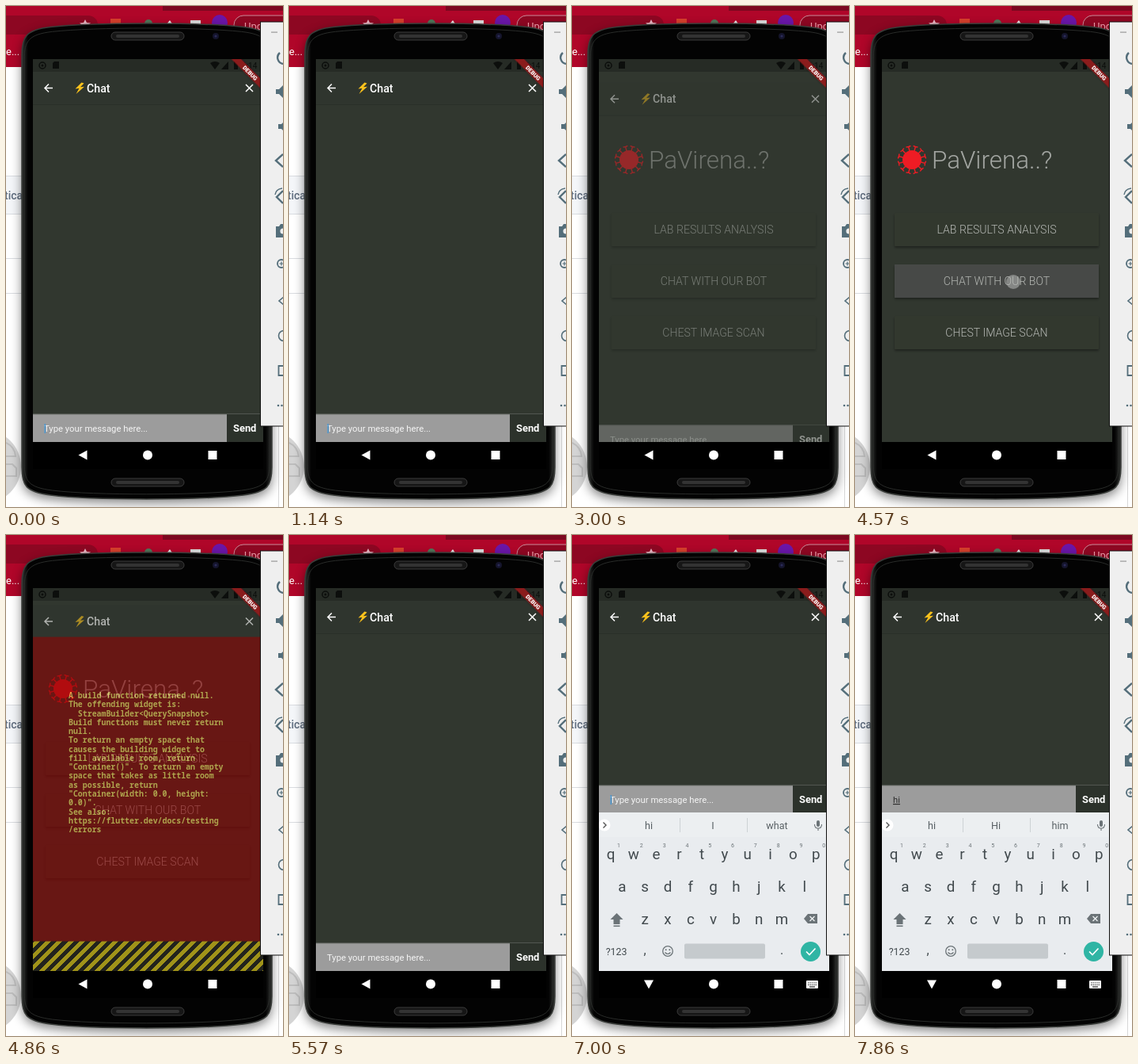
These frames come from a looping animation (350x632 px, 8 s). An HTML page:

```html
<!DOCTYPE html>
<html lang="en">
<head>
<meta charset="utf-8">
<title>Chat demo</title>
<style>
  html, body { margin: 0; width: 100%; height: 100%; overflow: hidden; background: #fff; }
  svg { display: block; width: 100%; height: 100%; font-family: Roboto, sans-serif; }
  text { white-space: pre; }
  .mono { font: 700 9.9px "Noto Sans Mono", "DejaVu Sans Mono", monospace; fill: #ffea62; }
</style>
</head>
<body>
<svg id="stage" viewBox="0 0 350 632"></svg>
<script>
const LOOP = 8000;
const DARK = '#31372f', BAR = '#2f352e';

// Markup helpers
const rect = (x, y, w, h, fill, extra = '') =>
  `<rect x="${x}" y="${y}" width="${w}" height="${h}" fill="${fill}" ${extra}/>`;
const circle = (x, y, r, fill, extra = '') =>
  `<circle cx="${x}" cy="${y}" r="${r}" fill="${fill}" ${extra}/>`;
const text = (x, y, s, size, fill, extra = '') =>
  `<text x="${x}" y="${y}" font-size="${size}" fill="${fill}" ${extra}>${s}</text>`;
const path = (d, fill, extra = '') => `<path d="${d}" fill="${fill}" ${extra}/>`;
const line = (d, color, width = 1.5, extra = '') =>
  path(d, 'none', `stroke="${color}" stroke-width="${width}" ${extra}`);
const group = (id, body, extra = '') => `<g id="${id}" ${extra}>${body}</g>`;
const MID = 'text-anchor="middle"';

const defs = `<defs>
  <clipPath id="display"><rect x="34" y="67" width="291" height="517"/></clipPath>
  <clipPath id="app"><rect x="34" y="83" width="291" height="467"/></clipPath>
  <clipPath id="pressed"><rect x="50" y="326" width="258" height="42"/></clipPath>
  <filter id="soft" x="-20%" y="-20%" width="140%" height="140%"><feGaussianBlur stdDeviation="7"/></filter>
  <filter id="lift" x="-10%" y="-30%" width="120%" height="170%">
    <feDropShadow dx="0" dy="2" stdDeviation="1.6" flood-color="#000" flood-opacity=".38"/></filter>
  <filter id="glow" x="-20%" y="-60%" width="140%" height="220%">
    <feDropShadow dx="0" dy="0" stdDeviation="1.8" flood-color="#000" flood-opacity=".5"/></filter>
  <linearGradient id="hazard" gradientUnits="userSpaceOnUse" x1="34" y1="67" x2="41.073" y2="74.073" spreadMethod="repeat">
    <stop offset=".25" stop-color="#191712"/><stop offset=".25" stop-color="#e6ce0c"/>
    <stop offset=".75" stop-color="#e6ce0c"/><stop offset=".75" stop-color="#191712"/></linearGradient>
  <linearGradient id="shell" x1="0" x2="1" y1="0" y2="0">
    <stop offset="0" stop-color="#303230"/><stop offset=".025" stop-color="#030303"/>
    <stop offset=".975" stop-color="#030303"/><stop offset="1" stop-color="#303230"/></linearGradient>
</defs>`;

function desktop() {
  return rect(0, 0, 350, 632, '#fff') +
    rect(0, 0, 350, 77, '#b00629') + rect(198, 0, 152, 6, '#7c0820') +
    rect(-20, 12, 136, 24, '#8d0722', 'rx="12"') +
    path('M100 17l2 4 5 .5-4 3 1 5-4-3-4 3 1-5-4-3 5-.5z', '#e9b9c4') +
    rect(132, 16, 13, 8, '#d8402c') + circle(180, 22, 5, '#52765a') +
    path('M202 24l5-6 4 6z', '#eee') + rect(233, 18, 13, 7, '#ddd') +
    circle(270, 21, 10, '#6a16a8') +
    rect(288, 12, 80, 24, '#8d0722', 'rx="12" stroke="#c98a98"') +
    text(301, 30, 'Update', 13, '#f0a0ac') +
    text(0, 62, 'e...', 13, '#fff') +
    rect(0, 214, 40, 48, '#f4f6f9') +
    [214, 262, 318, 362].map(y => rect(0, y, 40, 1, '#d9dce0')).join('') +
    text(-2, 244, 'tica', 14, '#5d6b7d', 'font-weight="500"') +
    circle(-27, 581, 46, '#d4d4d4') +
    line('M0 551Q11 556 12 568H0M0 578h8l5 5v10H0', '#bdbdbd', 2) +
    rect(344, 530, 1, 102, '#d8d8d8');
}

const SHELL = 'M20 62C20 39 25 30 56 26.500C110 20.500 245 20.500 300 26.500C331 30 336 39 336 62V582' +
  'C336 605 331 613 300 617C245 623.500 110 623.500 56 617C25 613 20 605 20 582Z';

function phone() {
  const speaker = y => rect(133, y, 92, 10, '#161616', 'rx="5" stroke="#3b3b3b"') +
    rect(139, y + 3, 80, 4, '#333', 'rx="2"');
  return path(SHELL, '#000', 'opacity=".5" filter="url(#soft)" transform="translate(0 5)"') +
    path(SHELL, 'url(#shell)', 'stroke="#3a3d3a" stroke-width="1.5"') +
    line(SHELL, '#2b2d2b', 1, 'transform="translate(3.6 6.4) scale(.98)"') +
    speaker(33) + speaker(596) +
    circle(265, 38, 4, '#15152c') + circle(265, 38, 1.6, '#2b2b58') +
    rect(34, 67, 291, 517, '#000');
}

function statusBar() {
  const ink = '#0c0e0c';
  return rect(34, 67, 291, 16, '#262b25') +
    circle(46, 75, 4, 'none', `stroke="${ink}" stroke-width="1.5"`) + circle(46, 75, 1.5, ink) +
    path('M61 70h6v9h-8v-7z', ink) +
    path('M258 72q6-4 12 0l-6 8z', ink) + path('M281 70v10h-9z', ink) +
    rect(288, 70, 5, 10, ink) + text(298, 79, '9:14', 10, ink);
}

const banner = `<g transform="translate(325 67) rotate(45)">` +
  rect(-30, 19.8, 60, 8.5, '#8a1b1e', 'filter="url(#glow)"') +
  text(.8, 26.7, 'DEBUG', 7.2, '#fff', MID + ' font-weight="900"') + '</g>';

function virus() {
  let s = circle(72, 194, 12, '#ee1c24');
  for (let i = 0; i < 12; i++)
    s += `<g transform="translate(72 194) rotate(${i * 30 + 15})">` +
      line('M0-11V-17M-3-17.500Q0-16.500 3-17.500', '#ee1c24', 1.5) + '</g>';
  return s;
}

function home() {
  const labels = ['LAB RESULTS ANALYSIS', 'CHAT WITH OUR BOT', 'CHEST IMAGE SCAN'];
  const ripple = group('press', rect(50, 326, 258, 42, '#474947') +
    circle(200, 348, 9, '#858785', 'id="ripple"'), 'clip-path="url(#pressed)"');
  return rect(34, 83, 291, 467, DARK) + virus() +
    text(97, 205, 'PaVirena..?', 31.4, '#a3a6a2', 'font-weight="300"') +
    labels.map((s, i) => {
      const y = 261 + i * 65;
      return rect(50, y, 258, 42, DARK, 'rx="1" filter="url(#lift)"') + (i === 1 ? ripple : '') +
        text(179, y + 26, s, 14.1, '#b4b7b3', MID + ' font-weight="300"');
    }).join('');
}

const errorLines = ['A build function returned null.', 'The offending widget is:',
  '  StreamBuilder&lt;QuerySnapshot&gt;', 'Build functions must never return', 'null.',
  'To return an empty space that', 'causes the building widget to', 'fill available room, return',
  '"Container()". To return an empty', 'space that takes as little room', 'as possible, return',
  '"Container(width: 0.0, height:', '0.0)".', 'See also:', 'https://flutter.dev/docs/testing', '/errors'];

function chat() {
  const field = rect(34, 515, 245, 35, '#9c9c9c') + rect(34, 514.5, 291, 1, '#747874') +
    rect(279, 515, 46, 35, '#2c322b') +
    text(287, 537, 'Send', 12.9, '#fff', 'font-weight="700"') +
    text(48, 537, 'Type your message here...', 11.3, '#f4f4f4', 'id="hint"') +
    text(48, 537, '', 11.3, '#2b2b2b', 'id="typed" text-decoration="underline"') +
    rect(48.5, 527, 1.6, 12, '#4c97cf', 'id="caret"');
  const error = rect(34, 123, 291, 430, '#8b0303') + rect(34, 507, 291, 60, 'url(#hazard)') +
    errorLines.map((s, i) => `<text class="mono" x="79" y="${200.5 + i * 11.27}">${s}</text>`).join('');
  return rect(34, 67, 291, 483, DARK) +
    rect(34, 83, 291, 41, BAR) + rect(34, 124, 291, 1, '#292f28') +
    line('M59 103.500H49M54 98.500L49 103.500L54 108.500', '#fff', 1.5) +
    path('M95.500 96.500L87.500 104.500L92.500 103.800L88.500 111L99 101.800L94 102.300L98.500 97.500Z', '#fbc21c') +
    text(102, 108.5, 'Chat', 14.2, '#fff', 'font-weight="500"') +
    line('M303 99l9 9M312 99l-9 9', '#fff', 1.5) +
    group('field', field) + group('error', error);
}

function keyboard() {
  const ink = '#41494d', soft = '#6b7377', step = 28.8;
  const row = (s, x, y) => [...s].map((c, i) => text(x + i * step, y, c, 18.8, ink, MID)).join('');
  return rect(34, 350, 291, 200, '#eceff1') + rect(34, 381, 291, 169, '#e9ecef') +
    circle(41, 366, 7.5, '#fff') + line('M39.500 362.500l3.500 3.500-3.500 3.500', '#555', 1.4) +
    [97, 178, 259].map(x => text(x, 370.5, '', 12.6, '#596165', MID + ' class="tip"')).join('') +
    rect(136, 357, 1, 18, '#cdd2d5') + rect(221, 357, 1, 18, '#cdd2d5') +
    rect(309, 360, 4, 8, soft, 'rx="2"') + line('M306.500 365q0 5 4.500 5t4.500-5M311 370v3', soft, 1.1) +
    row('qwertyuiop', 49, 409) + row('asdfghjkl', 63.4, 450) + row('zxcvbnm', 92.2, 491) +
    [...'1234567890'].map((c, i) => text(59 + i * step, 394, c, 7, soft, MID)).join('') +
    path('M56.500 477l8 8h-4v6h-8v-6h-4z', soft) + rect(52.5, 492.5, 8, 1.6, soft) +
    path('M293 484l5-6h12v12h-12z', soft) + line('M300.500 481l6 6m0-6l-6 6', '#eceff1', 1.4) +
    text(56, 529.5, '?123', 12.4, ink, MID) + text(92, 529, ',', 16, ink, MID) +
    circle(121, 525, 6.3, 'none', `stroke="${soft}" stroke-width="1.3"`) +
    circle(118.7, 523.3, 1, soft) + circle(123.3, 523.3, 1, soft) +
    line('M117.500 526.500q3.500 4 7 0', soft, 1.2) +
    rect(142, 515.5, 102, 19, '#c5cacd', 'rx="2"') + text(265, 529, '.', 16, ink, MID) +
    circle(301.5, 525.5, 12.5, '#2fb5a4') + line('M296 525.500l4 4 7.500-8', '#fff', 1.7);
}

function navBar() {
  const keys = rect(296, 562, 15, 10, '#fff', 'rx="1"') +
    line('M298 565h11M298 567.500h11', '#222', 1.2, 'stroke-dasharray="1.4 1"') +
    line('M300 570h7', '#222', 1.2);
  return path('M91.500 566.500L102.500 560.500V572.500Z', '#fff', 'id="back"') +
    group('hide', path('M91 561.500H103L97 572.500Z', '#fff') + keys) +
    circle(179, 566.5, 6, '#fff') + rect(255.5, 561, 11, 11, '#fff');
}

function toolPanel() {
  const c = '#546e7a', s = (d, w = 2.4) => line(d, c, w);
  const speaker = (x, y) => path(`M${x} ${y - 3}h4l5-5v16l-5-5h-4z`, c);
  const ring = (x, y, r, w) => circle(x, y, r, 'none', `stroke="${c}" stroke-width="${w}"`);
  return rect(321.5, 20, 30, 510, '#efefef', 'stroke="#111"') + rect(335, 32.5, 8, 1.2, '#999') +
    s('M346 59A8 8 0 0 0 350 73') + speaker(341, 108) + speaker(344, 152) +
    s('M350 187l-9 8 9 8') + s('M350 233l-8 8 8 8') + s('M340 238q1-7 9-8', 1.4) +
    path('M341 278h4l2-3h6v17h-12z', c) + circle(350, 284, 3.6, '#efefef') +
    ring(348, 325, 5, 1.8) + s('M345.500 325h5M348 322.500v5', 1.2) +
    s('M351 367l-6 5 6 5', 1.6) + ring(351, 416, 6.5, 1.6) + s('M352 454h-7.500v12h7.500', 1.8) +
    [344, 348.5].map(x => circle(x, 504, 1.3, c)).join('');
}

document.getElementById('stage').innerHTML = defs + desktop() + phone() +
  '<g clip-path="url(#display)">' +
  `<g clip-path="url(#app)">${group('home', home())}${group('chat', chat())}</g>` +
  statusBar() + banner + group('keys', keyboard()) + navBar() + '</g>' + toolPanel();

const el = id => document.getElementById(id);
const ui = Object.fromEntries(['chat', 'field', 'error', 'hint', 'typed', 'caret', 'press', 'ripple',
  'keys', 'back', 'hide'].map(id => [id, el(id)]));
const tips = document.querySelectorAll('.tip');
const set = (node, name, value) => node.setAttribute(name, value);
const show = (node, on) => set(node, 'display', on ? 'inline' : 'none');
const span = (t, from, to) => Math.min(1, Math.max(0, (t - from) / (to - from)));

// Cubic Bezier easing, solved by bisection
const bezier = (x1, y1, x2, y2) => x => {
  const at = (a, b, u) => 3 * a * u * (1 - u) ** 2 + 3 * b * u * u * (1 - u) + u ** 3;
  let lo = 0, hi = 1;
  for (let i = 0; i < 24; i++) {
    const mid = (lo + hi) / 2;
    if (at(x1, x2, mid) < x) lo = mid; else hi = mid;
  }
  return at(y1, y2, lo);
};
const fastOutSlowIn = bezier(.4, 0, .2, 1);
const easeIn = bezier(.42, 0, 1, 1);

const POP = 2888, PUSH = 4638, LOADED = 4950, FOCUS = 6600, RAISED = 6840, KEY_H = 7140, KEY_I = 7290;

function draw(t) {
  // Page transition
  const v = t < 4000 ? 1 - span(t, POP, POP + 300) : span(t, PUSH, PUSH + 300);
  show(ui.chat, v > 0);
  set(ui.chat, 'opacity', easeIn(v));
  set(ui.chat, 'transform', `translate(0 ${129 * (1 - fastOutSlowIn(v))})`);
  show(ui.error, t > PUSH && t < LOADED);

  // Button press
  const fade = span(t, PUSH, PUSH + 200);
  set(ui.press, 'opacity', span(t, 4380, 4540) * (1 - fade));
  set(ui.ripple, 'r', 9 * span(t, 4380, 4570) + 150 * fade);
  set(ui.ripple, 'opacity', 1 - fade);

  // Keyboard
  const rise = span(t, FOCUS, FOCUS + 220), open = t >= FOCUS;
  show(ui.keys, open);
  set(ui.keys, 'opacity', rise < 1 ? rise * .94 : 1);
  set(ui.keys, 'transform', `translate(0 ${102 * (1 - rise)})`);
  show(ui.back, !open);
  show(ui.hide, open);
  set(ui.field, 'transform', `translate(0 ${t >= RAISED ? -199 : 0})`);

  // Typing
  const typed = t >= KEY_I ? 'hi' : t >= KEY_H ? 'h' : '';
  const words = { '': ['hi', 'I', 'what'], h: ['h', 'H', 'he'], hi: ['hi', 'Hi', 'him'] }[typed];
  ui.typed.textContent = typed;
  tips.forEach((tip, i) => { tip.textContent = words[i]; });
  show(ui.hint, !typed);

  // Caret
  const since = t >= KEY_I ? t - KEY_I : t >= KEY_H ? t - KEY_H : open ? t - FOCUS : t + 250;
  show(ui.caret, (t < POP || open) && since % 1000 < 500);
  set(ui.caret, 'x', 48.5 + [0, 6.3, 9][typed.length]);
}

const start = performance.now();
function tick() {
  draw((performance.now() - start) % LOOP);
  requestAnimationFrame(tick);
}
tick();
</script>
</body>
</html>
```
